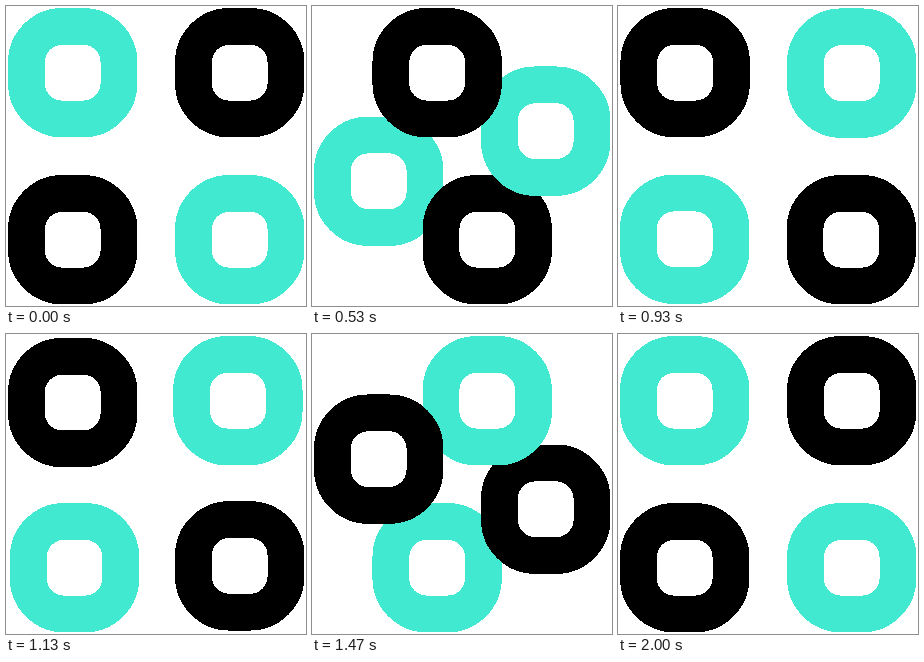
An HTML page for the animation above (2230 ms loop, 300 by 300 pixels).

```html
<!DOCTYPE html>
<html lang="en">
<head>
<meta charset="utf-8">
<title>Four rings</title>
<style>
  html, body { margin: 0; width: 100%; height: 100%; overflow: hidden; background: #fff; }
  svg { display: block; width: 100%; height: 100%; }
  rect { fill: none; stroke-width: 36.8; shape-rendering: crispEdges; }
</style>
</head>
<body>
<svg viewBox="0 0 300 300"></svg>
<script>
const LOOP = 2230, STEPS = 30, SPAN = 167;
const TEAL = '#41e9d0', BLACK = '#000';
const svg = document.querySelector('svg');

// Back to front; corners are numbered counterclockwise from the top left.
const rings = [[0, TEAL], [1, BLACK], [2, TEAL], [3, BLACK]].map(([corner, stroke]) => {
  const el = document.createElementNS('http://www.w3.org/2000/svg', 'rect');
  const attrs = { x: 20.4, y: 20.4, width: 92.6, height: 92.6, rx: 36, stroke };
  for (const name in attrs) el.setAttribute(name, attrs[name]);
  svg.append(el);
  return { el, corner };
});

// cubic-bezier(.8, 0, .2, 1)
function ease(x) {
  let lo = 0, hi = 1;
  for (let i = 0; i < 30; i++) {
    const t = (lo + hi) / 2, r = 1 - t;
    if (2.4 * t * r * r + 0.6 * t * t * r + t ** 3 < x) lo = t; else hi = t;
  }
  return lo * lo * (3 - 2 * lo);
}

// One coordinate of a walk around the unit square.
const side = s => Math.min(1, Math.max(0, 1.5 - Math.abs(s % 4 - 2.5)));

function draw(now) {
  const step = Math.min(2 * STEPS, Math.floor(now % LOOP * 0.03 + 0.15));
  const turn = Math.floor(step / STEPS) + ease(step % STEPS / STEPS);
  for (const { el, corner } of rings) {
    const s = corner + turn;
    el.setAttribute('transform', `translate(${SPAN * side(s)} ${SPAN * side(s + 1)})`);
  }
}

const start = performance.now();
function tick() {
  draw(performance.now() - start);
  requestAnimationFrame(tick);
}
tick();
</script>
</body>
</html>
```
